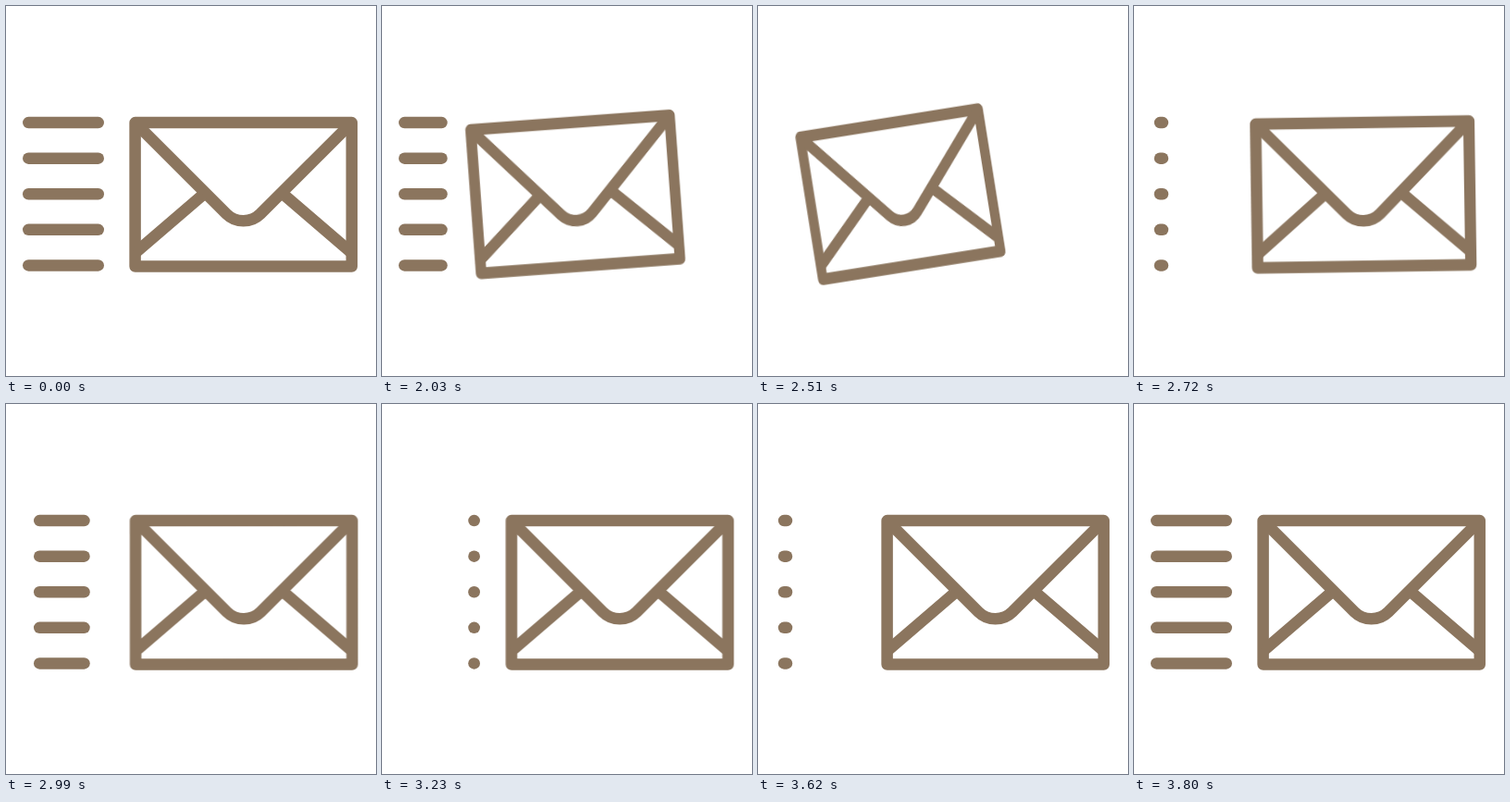
An HTML page without scripts for the animation above (3.83 s loop, 400 by 400 pixels).

```html
<!DOCTYPE html>
<html lang="en">
<head>
<meta charset="utf-8">
<title>Sending mail</title>
<style>
  html, body { margin: 0; width: 100%; height: 100%; overflow: hidden; background: #fff; }
  svg { display: block; width: 100%; height: 100%; }

  .mail {
    fill: none;
    stroke: #8b755e;
    stroke-width: 12.5;
    stroke-linejoin: round;
    transform-origin: 256.7px 203.8px;
    animation: spring 3830ms linear infinite;
  }
  .trail { fill: #8b755e; animation: blink 3830ms step-end infinite; }
  .trail rect {
    x: 18px;
    width: 88px;
    height: 12.5px;
    rx: 6.25px;
    animation: streak 3830ms linear infinite;
  }

  /* pull back, then shoot forward */
  @keyframes spring {
    0%, 52.99% { transform: translate(0, 0) rotate(0deg) scaleX(1); }
    53% {
      transform: translate(-46px, -.2px) rotate(-4.05deg) scaleX(.923);
      animation-timing-function: cubic-bezier(.064, 1, .141, 1);
    }
    67.885% {
      transform: translate(-102.7px, -.3px) rotate(-9.05deg) scaleX(.831);
      animation-timing-function: cubic-bezier(.11, 1, 0, 1);
    }
    83.55% {
      transform: translate(.7px, 0) rotate(0deg) scaleX(1);
      animation-timing-function: cubic-bezier(.11, 1, 0, 1);
    }
    99.2%, 100% { transform: translate(0, 0) rotate(0deg) scaleX(1); }
  }

  /* streaks blow to the left and are renewed on the right */
  @keyframes streak {
    0%, 52.99% { x: 18px; width: 88px; }
    53% {
      x: 18px; width: 54px;
      animation-timing-function: cubic-bezier(.064, 1, .141, 1);
    }
    67.88% { x: 18px; width: 12.5px; }
    70.23% { x: 25px; width: 30px; }
    71.02% { x: 22px; width: 15.5px; }
    72.58% { x: 8px; width: 12.5px; }

    72.59% { x: 93.5px; width: 12.5px; }
    75.72% { x: 44px; width: 59px; }
    78.07% { x: 30px; width: 61px; }
    80.42% { x: 26px; width: 42px; }
    82.77% { x: 22px; width: 15.5px; }
    84.33% { x: 8px; width: 12.5px; }

    84.34% { x: 93.5px; width: 12.5px; }
    87.47% { x: 46px; width: 58px; }
    89.82% { x: 33px; width: 60.5px; }
    92.17% { x: 26px; width: 42px; }
    94.52% { x: 22px; width: 15.5px; }
    96.08% { x: 8px; width: 12.5px; }

    96.09% { x: 93.5px; width: 12.5px; }
    99.2%, 100% { x: 18px; width: 88px; }
  }

  @keyframes blink {
    0% { visibility: visible; }
    60.8% { visibility: hidden; }
    70.2%, 100% { visibility: visible; }
  }
</style>
</head>
<body>
<svg viewBox="0 0 400 400">
  <g class="trail">
    <rect y="119.8"/>
    <rect y="158.4"/>
    <rect y="197"/>
    <rect y="235.6"/>
    <rect y="274.2"/>
  </g>
  <g class="mail">
    <rect x="139.6" y="126.1" width="234.2" height="155.4"/>
    <path d="M139.6 126.1L238.4 224.8A26 26 0 0 0 275 224.8L373.8 126.1"/>
    <path d="M139.6 267L213 204M373.8 267L300.4 204"/>
  </g>
</svg>
</body>
</html>
```
